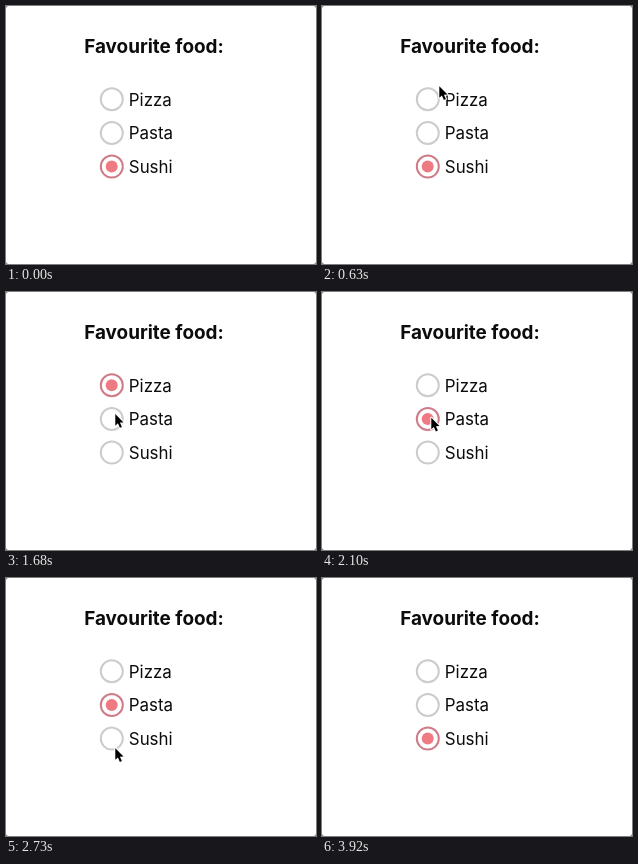
An HTML page that plays this animation: 310 px wide and 258 px high, repeating every 4.48 s.

```html
<!DOCTYPE html>
<html lang="en">
<head>
<meta charset="utf-8">
<title>Favourite food</title>
<style>
  html, body { margin: 0; width: 100%; height: 100%; overflow: hidden; background: #fff; }
  svg { display: block; width: 310px; height: 258px; }
  text { font: 16.9px Inter, sans-serif; fill: #0c0c0c; }
  .title { font-size: 18.9px; font-weight: 700; }
  .ring { fill: #fff; stroke: #ccc; stroke-width: 2; }
  .selected .ring { stroke: #d07c88; }
  .dot { fill: #ee7a82; visibility: hidden; }
  .selected .dot { visibility: visible; }
</style>
</head>
<body>
<svg viewBox="0 0 310 258">
  <path d="M0 0h2L0 2zM310 0v2l-2-2zM0 258v-2l2 2zM310 258h-2l2-2z" fill="#999"/>
  <text class="title" x="78.2" y="47.3">Favourite food:</text>
  <g id="options"></g>
  <g id="pointer">
    <circle id="press" r="22" fill="none" stroke="#444" stroke-width="1.6"/>
    <path d="M.3 1.2v11.6l2.6-2.4 2 4.5 2-.9-2-4.3 3.6-.2z"
      fill="#000" stroke="#fff" stroke-width="2" stroke-linejoin="round" paint-order="stroke"/>
  </g>
</svg>
<script>
const LOOP = 4480, STEP = 70;
const labels = ['Pizza', 'Pasta', 'Sushi'];
const clicks = [
  { down: 980, up: 1050, select: 1190, option: 0 },
  { down: 1960, up: 2100, select: 2100, option: 1 },
  { down: 3290, up: 3430, select: 3430, option: 2 }
];
// Each leg of the pointer's trip starts where the last one ended
const entry = { x: 153, y: 214 };
const legs = [
  { start: 70, end: 350, x: 108, y: 42 },
  { start: 350, end: 630, x: 117, y: 79 },
  { start: 630, end: 980, x: 109, y: 92 },
  { start: 1400, end: 1820, x: 109, y: 124.5 },
  { start: 2170, end: 2730, x: 109, y: 169, bend: 6 },
  { start: 3710, end: 3850, x: 141, y: 244 }
];
const pointer = document.getElementById('pointer');
const press = document.getElementById('press');
const optionGroup = document.getElementById('options');

optionGroup.innerHTML = labels.map((label, i) => {
  const y = 93.3 + 33.65 * i;
  return `<g>
    <circle class="ring" cx="105.8" cy="${y}" r="11"/>
    <circle class="dot" cx="105.7" cy="${y}" r="6"/>
    <text x="122.8" y="${y + 6.3}">${label}</text>
  </g>`;
}).join('');

const easeOut = k => 1 - (1 - k) ** 2;
const show = (el, visible) => { el.style.display = visible ? '' : 'none'; };

function pointerAt(t) {
  let { x, y } = entry;
  for (const leg of legs) {
    if (t < leg.start) break;
    const k = easeOut(Math.min(1, (t - leg.start) / (leg.end - leg.start)));
    x += (leg.x - x) * k + (leg.bend || 0) * Math.sin(Math.PI * k);
    y += (leg.y - y) * k;
  }
  return [x, y];
}

function draw(now) {
  const t = Math.floor((now % LOOP) / STEP) * STEP;
  const { option } = clicks.findLast(click => t >= click.select) || clicks.at(-1);
  [...optionGroup.children].forEach((group, i) =>
    group.classList.toggle('selected', i === option));
  show(pointer, t >= legs[0].start && t <= legs.at(-1).end);
  show(press, clicks.some(({ down, up }) => t >= down && t < up));
  pointer.setAttribute('transform', `translate(${pointerAt(t)})`);
}

const start = performance.now();
function tick() {
  draw(performance.now() - start);
  requestAnimationFrame(tick);
}
tick();
</script>
</body>
</html>
```
